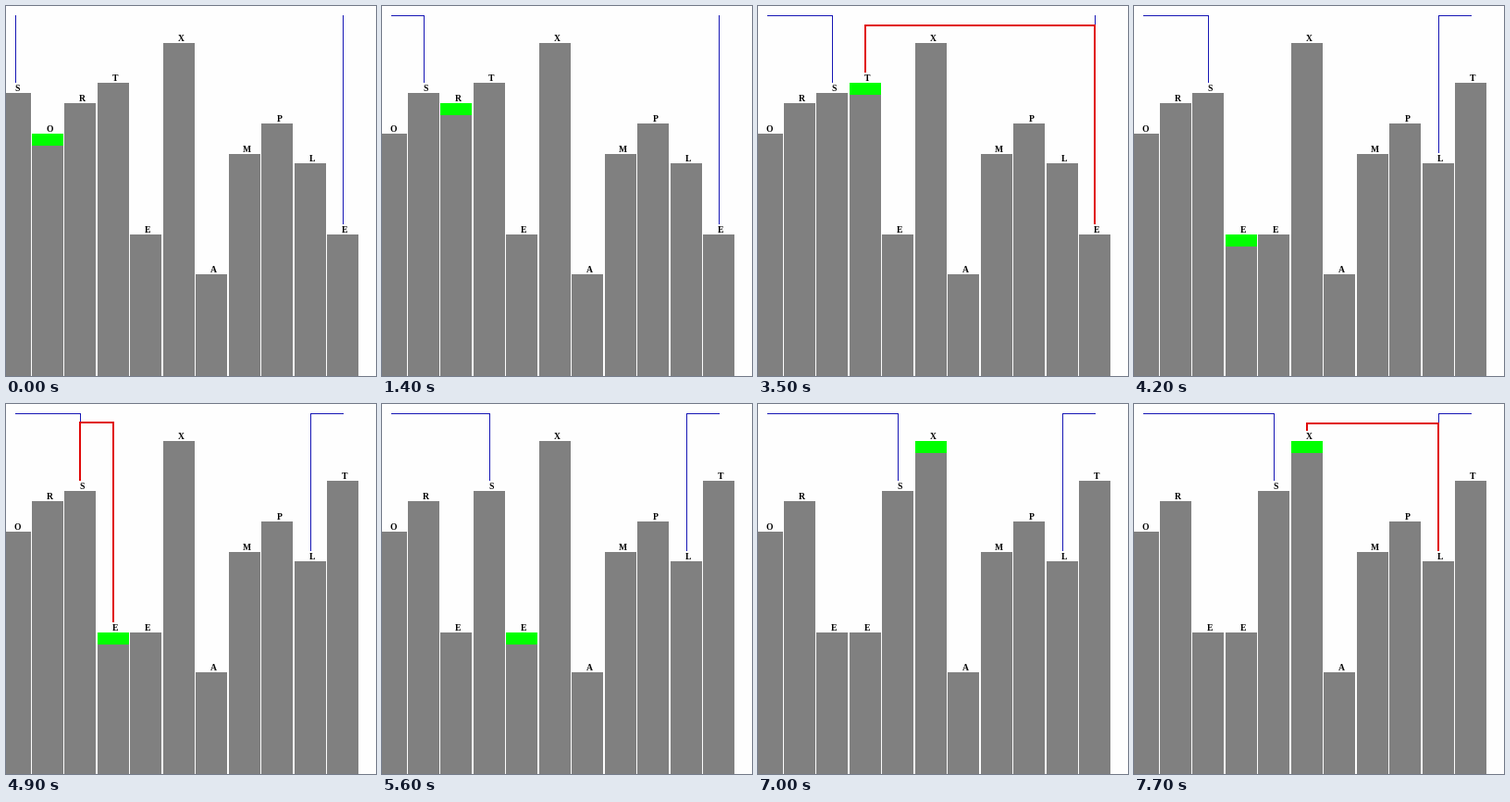
Recreate the animation shown at these times as a matplotlib script. Size 400 by 400 pixels, loop 8 s.

```python
import matplotlib.pyplot as plt
from matplotlib.animation import FuncAnimation
from matplotlib.patches import Rectangle

SIZE = 400
INTERVAL = 100
FRAMES = 80
HOLD = 7  # frames per step

PAPER, GRAY, GREEN = "#fefefe", "#808080", "#00ff00"
BLUE, RED = "#1414b4", "#e00808"
WORD = "SORTEXAMPLE"
CENTERS = [int(10 + 390 * k / 11) for k in range(len(WORD))]


def top_of(letter):
    return round(290 - (ord(letter) - ord("A")) * 250 / 23)


def partition(word):
    """Three-way partition steps: (letters, lt, i, gt, swap pair or None)."""
    a = list(word)
    pivot, lt, i, gt = a[0], 0, 1, len(a) - 1
    steps = [(a[:], lt, i, gt, None)]
    while i <= gt:
        if a[i] == pivot:
            i += 1
        else:
            pair = (lt, i) if a[i] < pivot else (i, gt)
            steps.append((a[:], lt, i, gt, pair))
            p, q = pair
            a[p], a[q] = a[q], a[p]
            if p == lt and q == i:
                lt, i = lt + 1, i + 1
            else:
                gt -= 1
        steps.append((a[:], lt, i, gt, None))
    return steps


STEPS = partition(WORD)

fig = plt.figure(figsize=(4, 4), dpi=100, facecolor=PAPER)
ax = fig.add_axes([0, 0, 1, 1])


def box(x0, y0, x1, y1, color):
    ax.add_patch(Rectangle((x0, y0), x1 - x0, y1 - y0, facecolor=color,
                           linewidth=0, antialiased=False))


def marker(anchor, k, letters):
    """Thin blue line from an outer edge to the pointer at bar k."""
    x0, x = CENTERS[anchor], CENTERS[k]
    box(min(x0, x), 10, max(x0, x) + 1, 11, BLUE)
    box(x, 10, x + 1, top_of(letters[k]) - 11, BLUE)


def bracket(p, q, y, letters):
    """Thick red link between the two bars about to swap."""
    box(CENTERS[p] - 1, y, CENTERS[q] + 1, y + 2, RED)
    for k in (p, q):
        box(CENTERS[k] - 1, y, CENTERS[k] + 1, top_of(letters[k]) - 11, RED)


def draw(frame):
    letters, lt, i, gt, pair = STEPS[frame // HOLD]
    ax.clear()
    ax.set(xlim=(0, SIZE), ylim=(SIZE, 0))
    ax.axis("off")
    for k, (c, letter) in enumerate(zip(CENTERS, letters)):
        y = top_of(letter)
        box(c - 17, y, c + 17, SIZE, GRAY)
        if k == i:
            box(c - 17, y, c + 17, y + 13, GREEN)
        ax.text(c + 2.5, y - 2, letter, ha="center", va="baseline",
                family="Liberation Serif", weight="bold",
                size=9.6 * 0.72, color="black")
    marker(0, lt, letters)
    marker(len(WORD) - 1, gt, letters)
    if pair:
        bracket(*pair, 19 if pair[0] == lt else 20, letters)
    return []


anim = FuncAnimation(fig, draw, frames=FRAMES, interval=INTERVAL,
                     init_func=lambda: draw(0), repeat=True, repeat_delay=0)
plt.show()
```
